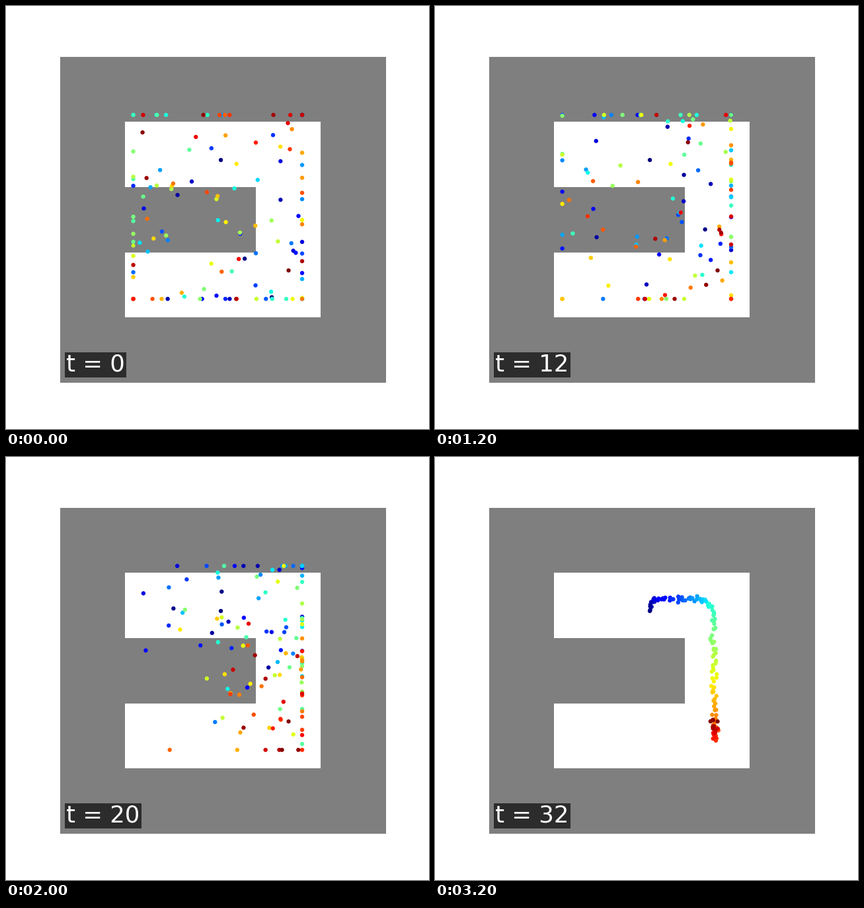
A matplotlib script for the animation above (3.34 s loop, 640 by 640 pixels).

```python
import numpy as np
import matplotlib.pyplot as plt
from matplotlib.animation import FuncAnimation

STEPS, DOTS = 32, 128
LOOP_MS, TICK_MS = 3340, 10

MAZE = ["#####",
        "#...#",
        "###.#",
        "#...#",
        "#####"]

# All positions are in maze cells; dots are clipped to CENTRE +- HALF.
CENTRE = np.array([2.422, 2.305])
HALF = np.array([1.296, 1.412])

# Bends of the solved route: share of the dots passed, x, y
BENDS = np.array([(0, 2.47, 1.585), (.05, 2.51, 1.43), (.13, 2.72, 1.40),
                  (.32, 3.29, 1.41), (.41, 3.45, 1.55), (.75, 3.46, 3.13),
                  (.86, 3.49, 3.58), (.98, 3.44, 3.31), (1, 3.51, 3.28)])


def diffuse(rng):
    """Positions at every step, noised backwards from the solved route."""
    u = np.linspace(0, 1, DOTS)
    share, x, y = BENDS.T
    path = np.column_stack([np.interp(u, share, x), np.interp(u, share, y)])
    path[1:-1] += rng.normal(0, 0.025, (DOTS - 2, 2))

    states = np.empty((STEPS + 1, DOTS, 2))
    states[STEPS] = (path - CENTRE) / HALF
    signal = np.sin(np.pi / 2 * np.arange(STEPS + 1) / STEPS)
    for t in reversed(range(STEPS)):
        keep = signal[t] / signal[t + 1]
        noise = rng.normal(size=(DOTS, 2))
        states[t] = keep * states[t + 1] + np.sqrt(1 - keep ** 2) * noise
    states[:, [0, -1]] = states[STEPS, [0, -1]]  # start and goal stay put
    return CENTRE + HALF * np.clip(states, -1, 1)


def step_at(ms):
    """Steps alternate between 130 ms and 70 ms."""
    pair, rest = divmod(ms, 200)
    return min(2 * pair + (rest >= 130), STEPS)


states = diffuse(np.random.default_rng(7))
walls = np.array([[cell == "#" for cell in row] for row in MAZE])

fig, ax = plt.subplots(figsize=(6.4, 6.4), dpi=100, facecolor="white")
ax.axis("off")
ax.imshow(0.5 * walls, cmap="binary", vmin=0, vmax=1, extent=(0, 5, 5, 0))

dots = ax.scatter(*states[0].T, c=np.linspace(0, 1, DOTS), cmap="jet",
                  s=21, linewidths=0, zorder=3)
label = ax.text(0.02, 0.02, "t = 0", transform=ax.transAxes, color="white",
                fontsize=25.6, family="DejaVu Sans", va="bottom", zorder=4,
                bbox=dict(boxstyle="square,pad=0.06", fc=(0, 0, 0, 0.65),
                          lw=0))


def update(frame):
    t = step_at(frame * TICK_MS)
    dots.set_offsets(states[t])
    label.set_text(f"t = {t}")
    return dots, label


anim = FuncAnimation(fig, update, frames=LOOP_MS // TICK_MS,
                     interval=TICK_MS, repeat=True, repeat_delay=0)
plt.show()
```
